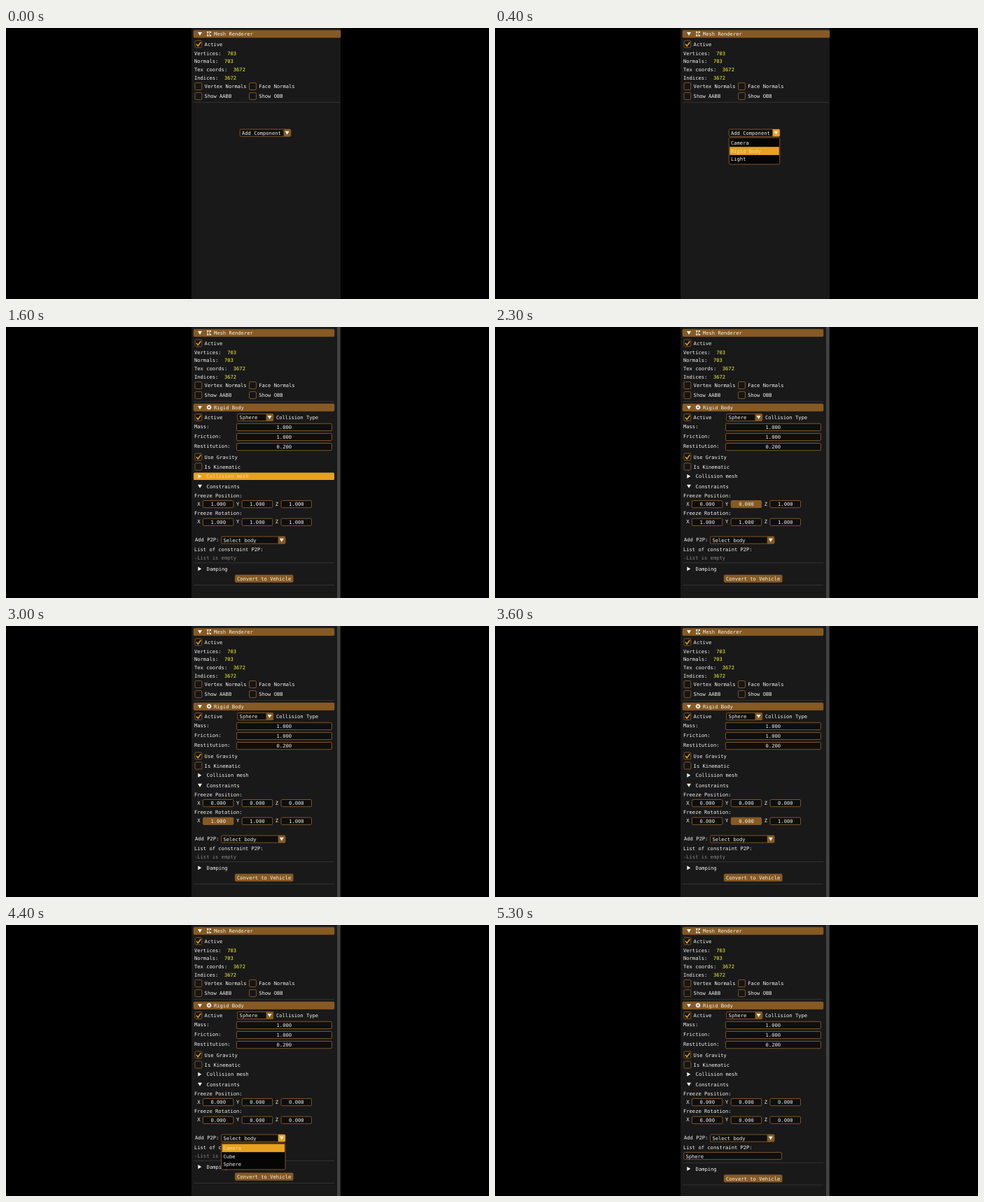
An HTML page for the animation above (5.4 s loop, 690 by 388 pixels).

```html
<!DOCTYPE html>
<html lang="en">
<head>
<meta charset="utf-8">
<title>Component inspector</title>
<style>
  html, body { margin: 0; width: 100%; height: 100%; overflow: hidden; background: #000; }
  svg { display: block; width: 690px; height: 388px; }
  text {
    font: 7.13px "DejaVu Sans Mono", "Liberation Mono", monospace;
    text-rendering: geometricPrecision;
    white-space: pre;
  }
</style>
</head>
<body>
<svg id="stage" viewBox="0 0 690 388"></svg>
<script>
const LOOP = 5400, STEP = 100;
const C = {
  panel: '#191919', field: '#0e0e0e', popup: '#050505', brown: '#865a22', edge: '#8a5c28',
  hot: '#e8a120', white: '#f2f2f2', pale: '#f8d898', yellow: '#f8f832', grey: '#858585',
  line: '#393939', bar: '#424242'
};

// What the pointer rests on, from each time onward.
const HOVER = [
  [0, ''], [100, 'add'], [300, 'item0'], [400, 'item1'],
  [600, 'restitution'], [800, 'friction'], [1000, 'mass'], [1100, 'type'],
  [1200, 'item0'], [1300, 'item1'], [1400, 'friction'], [1500, 'restitution'],
  [1600, 'mesh'], [1700, 'constraints'], [1800, ''],
  [2000, 'pos0'], [2200, 'pos1'], [2400, 'pos2'], [2600, ''], [2700, 'rot2'], [2800, ''],
  [3000, 'rot0'], [3400, 'rot1'], [3700, 'rot2'], [4000, 'body'],
  [4400, 'item0'], [4500, 'item1'], [4600, 'item2'],
  [4900, 'damping'], [5100, '']
];
const ZERO_AT = { pos: [2100, 2300, 2500], rot: [3200, 3500, 3800] };

const hoverAt = t => HOVER.filter(([from]) => t >= from).pop()[1];
const within = (t, a, b) => t >= a && t < b;

const rect = (x, y, w, h, fill, extra = '') =>
  `<rect x="${x}" y="${y}" width="${w}" height="${h}" fill="${fill}" ${extra}/>`;
const frame = (x, y, w, h = 10.2, fill = C.field) =>
  rect(x, y, w, h, fill, `rx="1.5" stroke="${C.edge}" stroke-width=".9"`);
// y is the middle of the capitals.
const text = (x, y, s, fill = C.white, anchor = 'start') =>
  `<text x="${x}" y="${y + 2.6}" fill="${fill}" text-anchor="${anchor}">${s}</text>`;
const path = (d, fill, extra = '') => `<path d="${d}" fill="${fill}" ${extra}/>`;
const down = (x, y) => path(`M${x - 3} ${y - 2.3}h6l-3 5z`, C.white);
const right = (x, y) => path(`M${x - 2.2} ${y - 3}v6l5-3z`, C.white);
const rule = (y, end) => rect(268, y, end - 268, .8, C.line);

function check(x, y, label, on) {
  const tick = on
    ? path(`M${x + 2} ${y + 5}l2.3 2.8 4-5.6`, 'none', `stroke="${C.hot}" stroke-width="1.5"`)
    : '';
  return frame(x, y, 9.8, 10, '#151515') + tick + text(x + 13.6, y + 5, label);
}

function combo(x, y, w, value, hot) {
  return frame(x, y, w) + rect(x + w - 10.3, y, 10.3, 10.2, hot ? C.hot : C.brown, 'rx="1.2"') +
    down(x + w - 5.2, y + 5) + text(x + 2.8, y + 5.1, value);
}

function list(x, y, w, items, hover) {
  let out = frame(x, y, w, items.length * 11.7 + 3, C.popup);
  items.forEach((name, i) => {
    const hot = hover === 'item' + i, top = y + 1.5 + i * 11.7;
    if (hot) out += rect(x + 1, top, w - 2, 11.7, C.hot);
    out += text(x + 2.8, top + 5.9, name, hot ? C.pale : C.white);
  });
  return out;
}

function header(y, label, end, icon) {
  return rect(268, y, end - 268, 10.5, C.brown, `rx="1.5" stroke="${C.edge}" stroke-width=".6"`) +
    down(277, y + 5.2) + icon + text(297, y + 5.6, label);
}

function tree(y, label, open, hot) {
  return (hot ? rect(268, y - 5.2, 201, 10.4, C.hot, 'rx="1.5"') : '') +
    (open ? down(277, y) : right(276.5, y)) + text(286.6, y, label, hot ? C.pale : C.white);
}

function slider(y, label, value, hot) {
  return text(269, y - .8, label) + frame(329.4, y - 5.1, 136, 10.2, hot ? C.brown : C.field) +
    text(397.3, y + .1, value, C.white, 'middle');
}

function axes(y, key, t, hover) {
  return ['X', 'Y', 'Z'].map((axis, i) => {
    const x = 281.4 + i * 55.8;
    const hot = hover === key + i;
    return text(x - 8.2, y - .5, axis) + frame(x, y - 5.1, 43.5, 10.2, hot ? C.brown : C.field) +
      text(x + 21.8, y + .1, t >= ZERO_AT[key][i] ? '0.000' : '1.000', C.white, 'middle');
  }).join('');
}

const meshIcon =
  path('M288 5.8h4l-1.5 2.7 1.5 2.5h-4z', 'none', `stroke="${C.white}" stroke-width=".8"`) +
  [[287, 5], [291.4, 5], [287, 10], [291.4, 10]]
    .map(([x, y]) => rect(x, y, 1.7, 1.7, C.white)).join('');
const gearIcon =
  `<circle cx="290" cy="115" r="2.9" fill="none" stroke="${C.white}" stroke-width="1.2" stroke-dasharray="1.45 .83"/>` +
  `<circle cx="290" cy="115" r="2" fill="none" stroke="${C.white}" stroke-width="1.6"/>`;

function meshPart(end) {
  const counts = [['Vertices:', 703], ['Normals:', 703], ['Tex coords:', 3672], ['Indices:', 3672]];
  return header(3.2, 'Mesh Renderer', end, meshIcon) + check(270, 18, 'Active', true) +
    counts.map(([label, n], i) => {
      const y = 35.9 + i * 11.7;
      return text(269, y, label) + text(269 + (label.length + 2) * 4.292, y, n, C.yellow);
    }).join('') +
    check(270, 78.5, 'Vertex Normals') + check(347.6, 78.5, 'Face Normals') +
    check(270, 92.6, 'Show AABB') + check(347.6, 92.6, 'Show OBB') + rule(106.1, end);
}

function bodyPart(t, hover) {
  const linked = t >= 4900, dy = linked ? 2.7 : 0;
  let out = rect(473, 0, 4.6, 388, C.bar) +
    header(110, 'Rigid Body', 469, gearIcon) + check(270, 124.4, 'Active', true) +
    combo(330.8, 124.3, 51, t < 1400 ? 'Box' : 'Sphere', hover === 'type' || within(t, 1200, 1400)) +
    text(386, 129.4, 'Collision Type') +
    slider(143.4, 'Mass:', '1.000', hover === 'mass') +
    slider(157.5, 'Friction:', '1.000', hover === 'friction') +
    slider(171.6, 'Restitution:', '0.200', hover === 'restitution') +
    check(270, 180.9, 'Use Gravity', true) + check(270, 195, 'Is Kinematic') +
    tree(213.8, 'Collision mesh', false, hover === 'mesh') +
    tree(228, 'Constraints', true, hover === 'constraints') +
    text(269, 241, 'Freeze Position:') + axes(253.6, 'pos', t, hover) +
    text(269, 266.8, 'Freeze Rotation:') + axes(279.3, 'rot', t, hover) +
    text(270, 304.1, 'Add P2P:') +
    combo(307.6, 300, 91.4, 'Select body', hover === 'body' || within(t, 4200, 4900)) +
    text(269, 318.2, 'List of constraint P2P:') +
    (linked ? frame(269.8, 325.5, 139.6) + text(272.4, 330.9, 'Sphere')
            : text(269, 330, '-List is empty', C.grey)) +
    rule(337.3 + dy, 469) + tree(346.2 + dy, 'Damping', false, hover === 'damping') +
    rect(327.2, 355 + dy, 83, 10.4, C.brown, `rx="1.5" stroke="${C.edge}" stroke-width=".6"`) +
    text(330, 360.2 + dy, 'Convert to Vehicle') + rule(369 + dy, 469);
  if (within(t, 1200, 1400))
    out += list(330.8, 136.3, 51, ['Box', 'Sphere', 'Capsule', 'Cylinder', 'Cone', 'Mesh'], hover);
  if (within(t, 4200, 4900))
    out += list(307.6, 312, 91.4, ['Camera', 'Cube', 'Sphere'], hover);
  return out;
}

function addPart(t, hover) {
  const open = t >= 200;
  return combo(334.2, 145, 72.6, 'Add Component', open || hover === 'add') +
    (open ? list(334.2, 157, 72.6, ['Camera', 'Rigid Body', 'Light'], hover) : '');
}

function draw(t) {
  const hover = hoverAt(t), added = t >= 600;
  return rect(0, 0, 690, 388, '#000') + rect(265, 0, 213, 388, C.panel) +
    meshPart(added ? 469 : 478) + (added ? bodyPart(t, hover) : addPart(t, hover));
}

const stage = document.getElementById('stage');
const start = performance.now();
let shown = -1;
function tick() {
  const t = Math.floor((performance.now() - start) % LOOP / STEP) * STEP;
  if (t !== shown) {
    stage.innerHTML = draw(t);
    shown = t;
  }
  requestAnimationFrame(tick);
}
tick();
</script>
</body>
</html>
```
